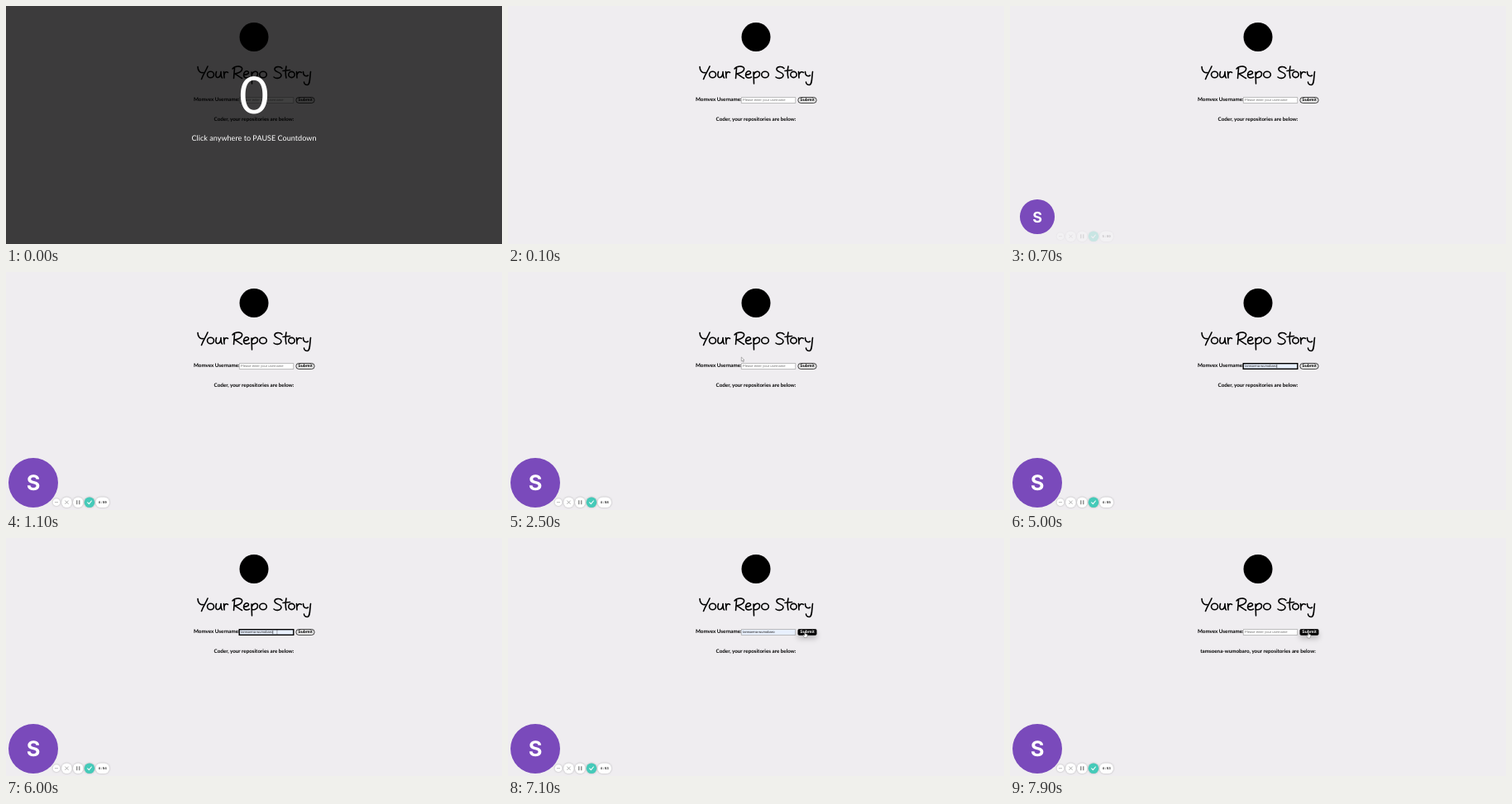
An HTML page that plays this animation: 600 px wide and 288 px high, repeating every 8000 ms.

```html
<!DOCTYPE html>
<html lang="en">
<head>
<meta charset="utf-8">
<title>Your Repo Story</title>
<style>
  html, body { margin: 0; width: 100%; height: 100%; overflow: hidden; background: #efedf0; }
  svg { display: block; width: 100%; height: 100%; text-rendering: geometricPrecision; }
  .bold { font: 700 6.25px Lato, sans-serif; }
  .field { font: 4.1px "Liberation Sans", sans-serif; }
  .mid { text-anchor: middle; }
  .line { fill: none; stroke-linecap: round; stroke-linejoin: round; }
  .chip { fill: #fff; filter: drop-shadow(0 .5px 1px #0004); }
</style>
</head>
<body>
<svg viewBox="0 0 600 288">
  <rect width="600" height="288" fill="#efedf0"/>
  <circle cx="300" cy="37.5" r="17.5"/>

  <g class="line" stroke="#000" stroke-width="1.6" role="img" aria-label="Your Repo Story">
    <path d="M232 73.500C232 78 234.500 81.500 238.500 80.500M244 73C242 78 238.500 83 236.500 88.500
      M254.500 79.500C253 84 254 87 256.500 86.500C259 86 260 82.500 260 79.500C260 83.500 260.500 86 261.500 87
      M263.500 79.500L264 87M264 83C264.500 80 266.500 79 268.500 80.500"/>
    <ellipse cx="247.500" cy="83" rx="4" ry="3.700"/>
    <path d="M276.500 75L275.500 87.500M274 76C278 71.500 287 72.500 285.500 77C284.500 80 279.500 81.500 276.500 82C279.500 83 282 86 285.500 87.500
      M287.500 83C291 83.500 295 81.500 293 79.500C290.500 77.500 287 80.500 287.500 84C288 87.500 292 87.500 294.500 86
      M297 80L297.500 94M297.500 83C298.500 78.500 304.500 78 304.500 82C304.500 85.500 301 87.500 298 86.500"/>
    <ellipse cx="311" cy="83" rx="4.300" ry="3.700"/>
    <path d="M334 75.500C331 72 324.500 73.500 325 77C326 80.500 333.500 80 333 84C332.500 87.500 327 88.500 324 86
      M339 73C338 78 338 83 339 87M335 78.500L343.500 77.500
      M351.500 79.500L352 87M352 83C353 80 355 79 357.500 80.500
      M359.500 79.500C359.500 84 362 86 365.500 84M368.500 79.500C367.500 86 368 95.500 364.500 95.500C362 95.500 360.500 93.500 360.500 92"/>
    <ellipse cx="345.500" cy="83" rx="3.700" ry="3.600"/>
  </g>

  <text class="bold" x="227" y="115.200">Momvex Username:</text>
  <rect id="box" x="282.200" y="110.700" width="65.600" height="6.600"/>
  <text id="entry" class="field" x="284" y="115.400"></text>
  <path id="caret" d="M0 111.900V116.200" stroke="#000" stroke-width=".5"/>

  <g id="submit">
    <rect id="button" x="350.900" y="110.500" width="22.200" height="6.900" stroke="#111" stroke-width=".8"/>
    <text id="buttonText" class="mid" x="362" y="115.400" font-family="Liberation Sans, sans-serif" font-size="5.100" font-weight="700">Submit</text>
  </g>
  <text id="heading" class="bold mid" x="300" y="139.200"></text>

  <g id="recorder">
    <g id="avatar">
      <circle r="30" fill="#7a4abb"/>
      <text class="mid" y="9.300" fill="#fff" font-family="Inter, sans-serif" font-size="25.500" font-weight="700">S</text>
    </g>
    <g id="tools">
      <circle class="chip" cx="61" cy="278.700" r="4.400"/>
      <path class="line" d="M59.300 278.700h3.400" stroke="#aaa" stroke-width=".8"/>
      <circle class="chip" cx="73.500" cy="278.700" r="6.300"/>
      <path class="line" d="M71.700 276.900l3.600 3.600m0-3.600l-3.600 3.600" stroke="#999" stroke-width=".8"/>
      <circle class="chip" cx="87.300" cy="278.700" r="6.300"/>
      <path d="M85.800 276.200v5m3-5v5" stroke="#777" stroke-width="1.200"/>
      <circle class="chip" cx="101" cy="278.700" r="6.300" style="fill:#45cab9"/>
      <path class="line" d="M98.700 278.900l1.700 1.700 3-3.600" stroke="#fff" stroke-width="1.100"/>
      <rect class="chip" x="108.300" y="272.400" width="16.800" height="12.600" rx="6.300"/>
      <text id="timer" class="mid" x="116.700" y="280" fill="#333" font-family="Liberation Mono, monospace" font-size="4.300" font-weight="700"></text>
    </g>
  </g>

  <g id="cursor" stroke="#666" stroke-width=".5" stroke-linejoin="round">
    <path id="arrow" fill="#fff" d="M0 0V5L1.200 4L2 6L2.900 5.600L2.100 3.700H3.700Z"/>
    <path id="beam" fill="none" d="M-1 0H1M0 0V5M-1 5H1"/>
    <path id="hand" fill="#fff" d="M-.5 0Q0 -.6 .5 0V2.400L2.800 3V5L2 7H-.8L-2.300 4.300L-1.700 3.600L-.5 4.500Z"/>
  </g>

  <g id="countdown">
    <rect width="600" height="288" fill="#000" opacity=".75"/>
    <g class="mid" fill="#fff" font-family="Lato, sans-serif">
      <text x="300" y="129.500" font-size="62">0</text>
      <text x="300" y="163" font-size="9.100">Click anywhere to PAUSE Countdown</text>
    </g>
  </g>
</svg>
<script>
const LOOP = 8000;
const USER = "tamsoena-wumobaro";
const KEY_TIMES = [3600, 3900, 4100, 4300, 4400];
const TICKS = [1000, 2000, 3000, 3950, 5000, 6000, 6900];
const FOCUS = 3000, AUTOFILL = 5000, HOVER = 6000, BLUR = 6900, SENT = 7800;
// time, x, y
const CURSOR_PATH = [[2450, 281, 102.5], [2800, 304, 111.5], [5950, 326, 111.5],
                     [6300, 359, 113.5], [6900, 359, 113.5], [7700, 361, 114]];

const $ = id => document.getElementById(id);
const set = (id, attrs) => {
  for (const name in attrs) $(id).setAttribute(name, attrs[name]);
};
const show = (id, visible) => set(id, { visibility: visible ? "visible" : "hidden" });
const progress = (t, start, end) => Math.min(1, Math.max(0, (t - start) / (end - start)));
const smooth = p => p * p * (3 - 2 * p);
const countPast = (times, t) => times.filter(time => t >= time).length;

function cursorAt(t) {
  const i = Math.min(Math.max(countPast(CURSOR_PATH.map(p => p[0]), t) - 1, 0), CURSOR_PATH.length - 2);
  const [t0, x0, y0] = CURSOR_PATH[i], [t1, x1, y1] = CURSOR_PATH[i + 1];
  const p = smooth(progress(t, t0, t1));
  return [x0 + (x1 - x0) * p, y0 + (y1 - y0) * p];
}

function drawField(t) {
  const focused = t >= FOCUS && t < BLUR;
  const filled = t >= AUTOFILL && t < SENT;
  const typed = t >= SENT ? "" : filled ? USER : USER.slice(0, countPast(KEY_TIMES, t));
  set("box", {
    fill: filled ? "#e8f0fe" : focused ? "#b0e0e6" : "#fff",
    stroke: focused ? "#000" : "#999",
    "stroke-width": focused ? 1.4 : .6
  });
  $("entry").textContent = typed || "Please enter your username";
  set("entry", { fill: typed ? "#222" : "#757575" });
  const caretX = 284.3 + (typed ? $("entry").getComputedTextLength() : 0);
  set("caret", { transform: `translate(${caretX})` });
  show("caret", focused);
}

function drawSubmit(t) {
  const hover = smooth(progress(t, HOVER, HOVER + 400));
  const grey = Math.round(239 * (1 - hover));
  const ink = Math.round(255 * hover);
  set("button", { fill: `rgb(${grey},${grey},${grey})`, rx: 3.3 - 2 * hover });
  set("buttonText", { fill: `rgb(${ink},${ink},${ink})` });
  $("submit").style.filter = hover ? `drop-shadow(0 4px 3px rgba(0,0,0,${.22 * hover}))` : "none";
}

function drawRecorder(t) {
  const scale = smooth(progress(t, 350, 900));
  set("avatar", { transform: `translate(33 255) scale(${scale})` });
  set("tools", { opacity: progress(t, 600, 1050) });
  show("recorder", t >= 400);
  const left = 300 - countPast(TICKS, t);
  $("timer").textContent = `${Math.floor(left / 60)}:${String(left % 60).padStart(2, "0")}`;
}

function drawCursor(t) {
  const [x, y] = cursorAt(t);
  set("cursor", { transform: `translate(${x} ${y})` });
  show("arrow", t >= 2450 && t < 2700);
  show("beam", t >= 2700 && t < 3600 || t > HOVER && t < 6200);
  show("hand", t >= 6200);
}

function render(t) {
  show("countdown", t < 100);
  drawField(t);
  drawSubmit(t);
  $("heading").textContent = `${t < SENT ? "Coder" : USER}, your repositories are below:`;
  drawRecorder(t);
  drawCursor(t);
}

const start = performance.now();
function frame(now) {
  render(Math.max(0, now - start) % LOOP);
  requestAnimationFrame(frame);
}
render(0);
requestAnimationFrame(frame);
</script>
</body>
</html>
```
